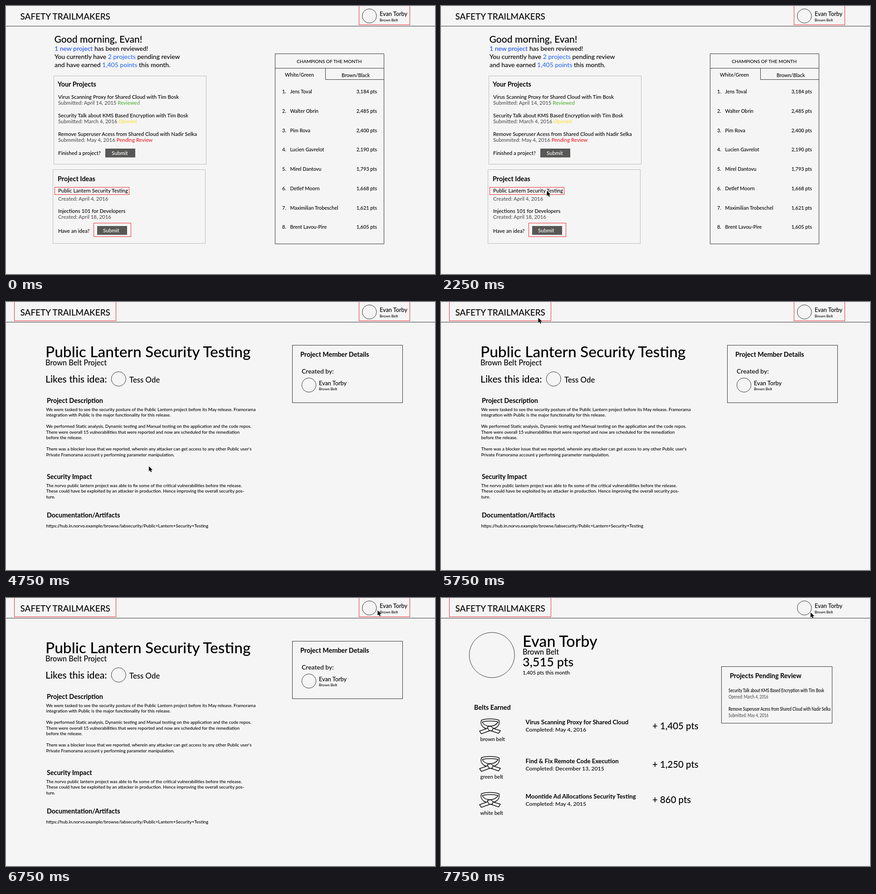
Write an HTML page that moves like this. It is 946x592 px and loops after 8 s.

```html
<!DOCTYPE html>
<html lang="en">
<head>
<meta charset="utf-8">
<title>Dashboard walkthrough</title>
<style>
  html, body { margin: 0; width: 100%; height: 100%; overflow: hidden; background: #f5f5f5; }
  svg { display: block; width: 946px; height: 592px; font: 500 11.4px Lato, "Open Sans", sans-serif; fill: #000; }
  .box { fill: none; stroke: #333; }
  .dots { fill: none; stroke: #808080; stroke-dasharray: 1 1; }
  .hot { fill: none; stroke: #ec2a32; }
  .button { fill: #575756; }
  .label { fill: #fff; font-size: 11.6px; }
  .head { font-size: 14.4px; font-weight: 700; }
  .intro { font-size: 14px; }
  .body { font-size: 9.8px; }
  .sub { fill: #505050; }
  .table { font-size: 10.9px; }
  .title { font-size: 13.3px; font-weight: 700; }
  .narrow { font-size: 10.6px; }
  .end { text-anchor: end; }
  .belt { fill: #f5f5f5; stroke: #111; stroke-width: 1.5; stroke-linejoin: round; }
</style>
</head>
<body>
<svg viewBox="0 0 946 592">
  <defs>
    <g id="user">
      <text font-size="12.7">Evan Torby</text>
      <text y="11.5" font-size="8.2">Brown Belt</text>
    </g>
    <g id="belt" class="belt">
      <path d="M5 4C14 0 34 0 44 4C46 11 43 17 38 20C30 25 18 25 10 20C5 16 3 10 5 4Z"/>
      <path d="M7 8C16 5 33 5 42 8C38 14 31 17 24 17S10 14 7 8Z"/>
      <path d="M21 21L1 28L5 34L27 26Z"/>
      <path d="M27 21L47 27L43 33L22 26Z"/>
      <path d="M18 19L25 17L31 21L29 27L22 27Z"/>
    </g>
  </defs>

  <path class="box" d="M0 44.5H946"/>
  <text x="31.5" y="30" font-size="18.9">SAFETY TRAILMAKERS</text>
  <circle class="box" cx="801.3" cy="22" r="15.7"/>
  <use href="#user" x="824" y="22"/>
  <rect id="homeLink" class="hot" x="18.5" y="-1.5" width="224" height="43"/>
  <rect id="userLink" class="hot" x="778.5" y="-1.5" width="112" height="43"/>

  <g class="scene">
    <text x="106.5" y="81" font-size="21.1">Good morning, Evan!</text>
    <g class="intro">
      <text x="107" y="99"><tspan fill="#2050e8">1 new project</tspan> has been reviewed!</text>
      <text x="107" y="117">You currently have <tspan fill="#2b6cf0">2 projects</tspan> pending review</text>
      <text x="107" y="135">and have earned <tspan fill="#2b6cf0">1,405 points</tspan> this month.</text>
    </g>

    <rect class="dots" x="105.5" y="154.5" width="336" height="195"/>
    <text class="head" x="114" y="178">Your Projects</text>
    <text x="115" y="205">Virus Scanning Proxy for Shared Cloud with Tim Bosk</text>
    <text x="115" y="218" class="sub">Submitted: April 14, 2015 <tspan fill="#4fae32">Reviewed</tspan></text>
    <text x="115" y="245.5">Security Talk about KMS Based Encryption with Tim Bosk</text>
    <text x="115" y="259" class="sub">Submitted: March 4, 2016 <tspan fill="#f7df3c">Opened</tspan></text>
    <text x="115" y="286.5">Remove Superuser Acess from Shared Cloud with Nadir Selka</text>
    <text x="115" y="300" class="sub">Submmited: May 4, 2016 <tspan fill="#ee1c25">Pending Review</tspan></text>
    <text x="115" y="329">Finished a project?</text>
    <rect class="button" x="219" y="315" width="66" height="19.5"/>
    <text class="label" x="233" y="329">Submit</text>

    <rect class="dots" x="103.5" y="361.5" width="336" height="163"/>
    <text class="head" x="114" y="386.5">Project Ideas</text>
    <rect class="hot" x="107.5" y="400.5" width="164" height="16"/>
    <text x="115" y="412">Public Lantern Security Testing</text>
    <text x="115" y="429.5" class="sub">Created: April 4, 2016</text>
    <text x="115" y="456.5">Injections 101 for Developers</text>
    <text x="115" y="470" class="sub">Created: April 18, 2016</text>
    <text x="115" y="501">Have an idea?</text>
    <rect class="hot" x="193.5" y="479.5" width="82" height="30"/>
    <rect class="button" x="201" y="486" width="66" height="19.5"/>
    <text class="label" x="214" y="500">Submit</text>

    <path class="box" d="M593.5 105.5H833.5V525.5H593.5ZM593.5 137.5H833.5M704.5 137.5V162.5H833.5"/>
    <text x="641" y="125.5" font-size="10.3">CHAMPIONS OF THE MONTH</text>
    <g id="ranking" class="table">
      <text x="615" y="156">White/Green</text>
      <text x="740" y="157">Brown/Black</text>
    </g>
  </g>

  <g class="scene">
    <text x="87" y="122" font-size="33.5">Public Lantern Security Testing</text>
    <text x="87" y="140" font-size="16.3">Brown Belt Project</text>
    <text x="87" y="178" font-size="21.2">Likes this idea:</text>
    <circle class="box" cx="248.3" cy="170" r="16"/>
    <text x="272" y="178" font-size="16.8">Tess Ode</text>
    <text class="head" x="90" y="223">Project Description</text>
    <g class="body">
      <text x="88.5" y="241">We were tasked to see the security posture of the Public Lantern project before its May release. Framorama</text>
      <text x="88.5" y="253">integration with Public is the major functionality for this release.</text>
      <text x="88.5" y="278">We performed Static analysis, Dynamic testing and Manual testing on the application and the code repos.</text>
      <text x="88.5" y="290.5">There were overall 15 vulnerabilities that were reported and now are scheduled for the remediation</text>
      <text x="88.5" y="303">before the release.</text>
      <text x="88.5" y="328">There was a blocker issue that we reported, wherein any attacker can get access to any other Public user's</text>
      <text x="88.5" y="340.5">Private Framorama account y performing parameter manipulation.</text>
      <text x="88.5" y="408.5">The norvo public lantern project was able to fix some of the critical vulnerabilities before the release.</text>
      <text x="88.5" y="421">These could have be exploited by an attacker in production. Hence improving the overall security pos-</text>
      <text x="88.5" y="433.5">ture.</text>
      <text x="88.5" y="497.5">https://hub.in.norvo.example/browse/labsecurity/Public+Lantern+Security+Testing</text>
    </g>
    <text class="head" x="90" y="390.5">Security Impact</text>
    <text class="head" x="90" y="476">Documentation/Artifacts</text>

    <rect class="box" x="631.5" y="95.5" width="243" height="127"/>
    <text class="head" x="649" y="121">Project Member Details</text>
    <text x="652" y="158" font-size="14">Created by:</text>
    <circle class="box" cx="668" cy="183.5" r="15.7"/>
    <use href="#user" x="690" y="183.5"/>
  </g>

  <g class="scene" id="profile">
    <circle class="box" cx="112.3" cy="126" r="50"/>
    <text x="180" y="108" font-size="34.2">Evan Torby</text>
    <text x="180" y="125" font-size="16.3">Brown Belt</text>
    <text x="180" y="151" font-size="27">3,515 pts</text>
    <text x="180" y="168.5">1,405 pts this month</text>
    <text class="head" x="73" y="247">Belts Earned</text>

    <rect class="box" x="618.5" y="151.5" width="244" height="125"/>
    <text class="head" x="637" y="176.5">Projects Pending Review</text>
    <g class="narrow" transform="translate(634 0) scale(.79 1)">
      <text y="208.5">Security Talk about KMS Based Encryption with Tim Bosk</text>
      <text y="222" class="sub">Opened: March 4, 2016</text>
      <text y="249.5">Remove Superuser Acess from Shared Cloud with Nadir Selka</text>
      <text y="263" class="sub">Submitted: May 4, 2016</text>
    </g>
  </g>

  <path id="cursor" stroke="#f5f5f5" stroke-width=".8" paint-order="stroke" d="M0 0V11L2.6 8.7L4.6 12.8L6.5 12L4.6 8H8.2Z"/>
</svg>
<script>
const $ = id => document.getElementById(id);
const text = (x, y, string, attrs = "") => `<text x="${x}" y="${y}" ${attrs}>${string}</text>`;
const append = (id, markup) => $(id).insertAdjacentHTML("beforeend", markup);

[
  ["Jens Toval", "3,184"], ["Walter Obrin", "2,485"], ["Pim Rova", "2,400"], ["Lucien Gavrelot", "2,190"],
  ["Mirel Dantovu", "1,793"], ["Detlef Moorn", "1,668"], ["Maximilian Trobeschel", "1,621"], ["Brent Lavou-Pire", "1,605"],
].forEach(([name, points], i) => {
  const y = 193 + 42.75 * i;
  append("ranking", text(609, y, `${i + 1}.`) + text(626.5, y, name) + text(818, y, `${points} pts`, 'class="end"'));
});

// belt, icon top, project, title baseline, completion date, points
[
  ["brown", 266, "Virus Scanning Proxy for Shared Cloud", 279, "May 4, 2016", "1,405"],
  ["green", 349, "Find &amp; Fix Remote Code Execution", 364.5, "December 13, 2015", "1,250"],
  ["white", 428.5, "Moontide Ad Allocations Security Testing", 442.5, "May 4, 2015", "860"],
].forEach(([belt, top, project, y, date, points]) => append("profile",
  `<use href="#belt" x="84" y="${top}"/>` +
  text(86.5, top + 50, `${belt} belt`) +
  text(186.5, y, project, 'class="title"') +
  text(186.5, y + 16, `Completed: ${date}`, 'font-size="12.3"') +
  text(466, y + 10.5, `+ ${points} pts`, 'font-size="20.4"')));

const LOOP = 8000;
const sceneStarts = [0, 3750, 7000];
const scenes = document.querySelectorAll(".scene");
// The pointer jumps: time, x, y
const stops = [
  [1250, 465, 225], [1500, 441, 264], [1750, 298.5, 405], [2000, 233, 409], [2250, 233.5, 408.5],
  [4750, 315, 363], [5000, 298.5, 143], [5250, 296.5, 139.5], [5500, 251.5, 77], [5750, 214.5, 35],
  [6250, 899, 2], [6500, 819, 28], [6750, 819.5, 27.5], [7750, 815, 32],
];
const show = (element, visible) => { element.style.display = visible ? "" : "none"; };

function draw(now) {
  const time = now % LOOP;
  const current = sceneStarts.findLastIndex(start => time >= start);
  scenes.forEach((scene, i) => show(scene, i === current));
  show($("homeLink"), current > 0);
  show($("userLink"), current < 2);
  const stop = stops.findLast(([start]) => time >= start);
  show($("cursor"), stop);
  if (stop) $("cursor").setAttribute("transform", `translate(${stop[1]} ${stop[2]})`);
  requestAnimationFrame(draw);
}
draw(performance.now());
</script>
</body>
</html>
```
